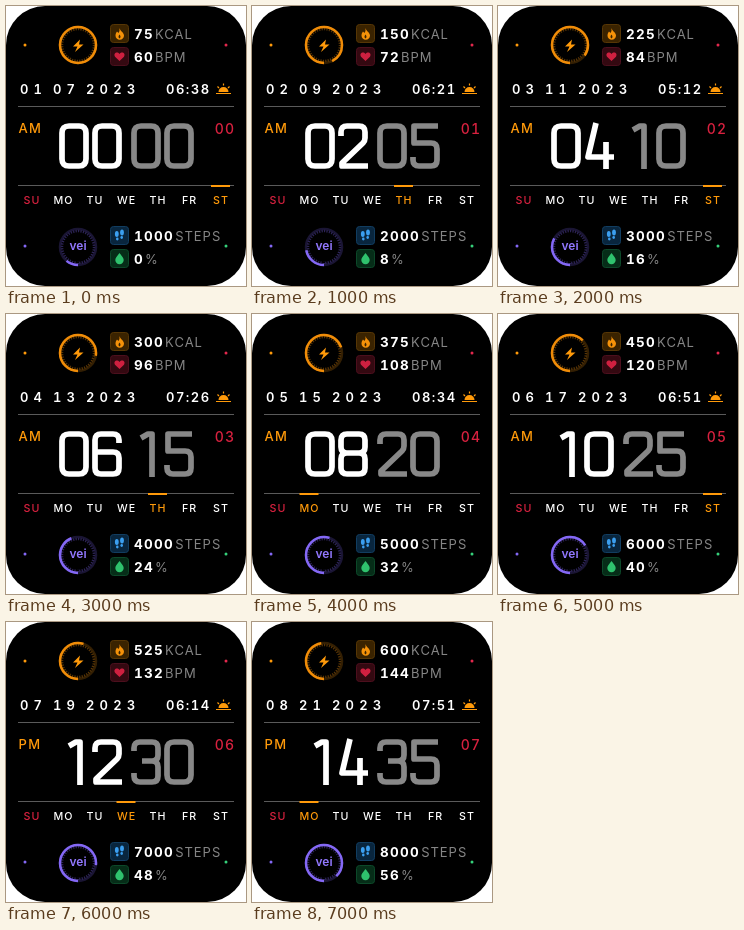
Animation, 240 px wide and 280 px high, one loop 8 s. Source, as an HTML page:

```html
<!DOCTYPE html>
<html lang="en">
<head>
<meta charset="utf-8">
<title>Watch face</title>
<style>
  html, body { margin: 0; width: 100%; height: 100%; overflow: hidden; background: #fff; }
  svg { display: block; width: 240px; height: 280px; }
  text { font: 500 13px Inter, sans-serif; font-variant-numeric: tabular-nums; fill: #fff; }
  .value { font-weight: 700; font-size: 13.5px; letter-spacing: 1.3px; }
  .unit { font-weight: 400; font-size: 13px; letter-spacing: 1px; fill: #858585; }
  .date { font-weight: 600; letter-spacing: 5.2px; }
  .sun { font-weight: 600; letter-spacing: 1.5px; }
  .side { letter-spacing: 1.3px; }
  .days text { font-size: 10.7px; letter-spacing: 1px; text-anchor: middle; }
  .days .sunday { fill: #d8213f; }
  .days .active { fill: #ff9a0a; }
  .digits { fill: none; stroke-width: 5.7; stroke-linejoin: round; }
  .ring { fill: none; }
</style>
</head>
<body>
<svg viewBox="0 0 240 280">
  <rect width="240" height="280" rx="39"/>
  <g id="rings"></g>
  <path d="M74 33.500 67 40.500H71.500L69 46 77.500 38.500H73Z" fill="#ff9a0a"/>
  <text x="72" y="244" text-anchor="middle" style="font-size:12px;font-weight:600;fill:#9278ff">vei</text>
  <g id="stats"></g>
  <path d="M113.500 22C114 25 118 26.500 118 29.500A4.200 4.200 0 0 1 109.500 29.500C109.500 28 110 27 111 25.500L112.500 27Q114 25 113.500 22ZM113.500 28.500Q111.500 31 113.500 32.500Q115.500 31 113.500 28.500Z" fill="#f59209" fill-rule="evenodd"/>
  <path d="M113.500 55 109 50.700C107 47.500 111 44.800 113.500 48C116 44.800 120 47.500 118 50.700Z" fill="#cf2040"/>
  <g fill="#3b9ff0">
    <ellipse cx="110.800" cy="228" rx="1.900" ry="3"/><ellipse cx="111.300" cy="233" rx="1.300" ry="1.400"/>
    <ellipse cx="116" cy="226.500" rx="1.900" ry="3"/><ellipse cx="115.700" cy="231.500" rx="1.300" ry="1.400"/>
  </g>
  <path d="M113.500 247C116 250.500 117.700 252 117.700 254A4.200 4.200 0 0 1 109.300 254C109.300 252 111 250.500 113.500 247Z" fill="#2fc26d"/>
  <text id="month" class="date" x="14" y="88"/>
  <text id="day" class="date" x="47" y="88"/>
  <text class="date" x="80" y="88">2023</text>
  <text id="sun" class="sun" x="160" y="87.500"/>
  <path d="M212.500 86A5 5 0 0 1 222.500 86Z" fill="#ff9a0a"/>
  <path d="M210 87.500H225M217.500 77.500V79.500M211.500 80.500L213 82M223.500 80.500L222 82" stroke="#ff9a0a" stroke-width="1.200"/>
  <path d="M12 100.500H228M12 179.500H228" stroke="#5a5a5a"/>
  <text id="half" class="side" x="12.500" y="127" style="fill:#ff9a0a"/>
  <text id="seconds" class="side" x="229.500" y="128" text-anchor="end" style="font-size:14px;fill:#d8213f"/>
  <g id="hours" class="digits" transform="translate(53 117)" stroke="#fff" role="img"></g>
  <g id="minutes" class="digits" transform="translate(125 117)" stroke="#888" role="img"></g>
  <g id="days" class="days"></g>
  <rect id="marker" y="179" width="19" height="2" fill="#ff9a0a"/>
</svg>
<script>
const $ = id => document.getElementById(id);
const pad = n => String(n).padStart(2, "0");
const dayX = i => 26 + i * 31.5;
const sunTimes = ["06:38", "06:21", "05:12", "07:26", "08:34", "06:51", "06:14", "07:51"];
const glyphs = {
  0: "M10 3H20Q27 3 27 10V36Q27 43 20 43H10Q3 43 3 36V10Q3 3 10 3Z",
  1: "M10 7 17 3H21V46",
  2: "M3 13V9Q3 3 9 3H21Q27 3 27 9V15Q27 18 25 20L4 40V43H30",
  3: "M3 12V9Q3 3 9 3H21Q27 3 27 9V16Q27 22 21 22H11M21 22Q27 22 27 28V37Q27 43 21 43H9Q3 43 3 37V34",
  4: "M12 0 4 34H30M22 19V46",
  5: "M28 3H4V20H21Q27 20 27 26V37Q27 43 21 43H9Q3 43 3 37V34",
  6: "M27 12V9Q27 3 21 3H9Q3 3 3 9V37Q3 43 9 43H21Q27 43 27 37V27Q27 21 21 21H3",
  8: "M9 3H21Q27 3 27 9V16Q27 22 21 22H9Q3 22 3 16V9Q3 3 9 3ZM9 22H21Q27 22 27 28V37Q27 43 21 43H9Q3 43 3 37V28Q3 22 9 22Z"
};

function ring(id, y, bright, dim) {
  const circle = attrs => `<circle class="ring" cx="72" cy="${y}" ${attrs}/>`;
  return circle(`r="18" stroke="${dim}" stroke-width="2.500" opacity=".6"`) +
    circle(`r="16" stroke="${dim}" stroke-width="2.500" pathLength="80" stroke-dasharray="1 1"`) +
    circle(`id="${id}" r="18" stroke="${bright}" stroke-width="2.500" pathLength="100" transform="rotate(90 72 ${y})"`);
}
$("rings").innerHTML = ring("battery", 39, "#f08c08", "#563406") + ring("score", 241, "#8468f5", "#2c2355") +
  [[19, 39, "#ff9a0a"], [220, 39, "#e3284d"], [19, 240, "#8468f5"], [220, 240, "#35d07a"]]
    .map(([x, y, color]) => `<circle cx="${x}" cy="${y}" r="1.500" fill="${color}"/>`).join("");

const stats = [
  ["kcal", "KCAL", 18, "#3a2300", "#563605"],
  ["bpm", "BPM", 41, "#340911", "#4c0f1d"],
  ["steps", "STEPS", 220, "#09263e", "#113d60"],
  ["percent", "%", 243, "#062d18", "#0c4829"]
];
$("stats").innerHTML = stats.map(([id, unit, y, fill, edge]) =>
  `<rect x="104.500" y="${y + .5}" width="18" height="18" rx="3" fill="${fill}" stroke="${edge}"/>
   <text x="128" y="${y + 15}"><tspan id="${id}" class="value"></tspan><tspan class="unit" dx="1">${unit}</tspan></text>`).join("");

$("days").innerHTML = ["SU", "MO", "TU", "WE", "TH", "FR", "ST"].map((name, i) =>
  `<text x="${dayX(i)}" y="198"${i ? "" : ' class="sunday"'}>${name}</text>`).join("");

function setDigits(id, n) {
  $(id).setAttribute("aria-label", pad(n));
  $(id).innerHTML = [...pad(n)].map((d, i) =>
    `<path d="${glyphs[d]}" transform="translate(${i * 33})"/>`).join("");
}

const setArc = (id, part) => $(id).setAttribute("stroke-dasharray", `${part} 200`);

function show(step) {
  const values = {
    kcal: 75 * (step + 1), bpm: 60 + 12 * step,
    steps: 1000 * (step + 1), percent: 8 * step,
    month: pad(step + 1), day: pad(7 + 2 * step),
    sun: sunTimes[step], half: step < 6 ? "AM" : "PM", seconds: pad(step)
  };
  for (const id in values) $(id).textContent = values[id];
  setDigits("hours", 2 * step);
  setDigits("minutes", 5 * step);
  setArc("battery", 100 - 7.5 * step);
  setArc("score", 11 * (step + 1));
  const weekday = new Date(2023, step, 7 + 2 * step).getDay();
  $("marker").setAttribute("x", dayX(weekday) - 10);
  [...$("days").children].forEach((day, i) => day.classList.toggle("active", i === weekday));
}

let shown = -1;
const start = performance.now();
function tick() {
  const step = Math.floor((performance.now() - start) / 1000) % 8;
  if (step !== shown) show(shown = step);
  requestAnimationFrame(tick);
}
tick();
</script>
</body>
</html>
```
